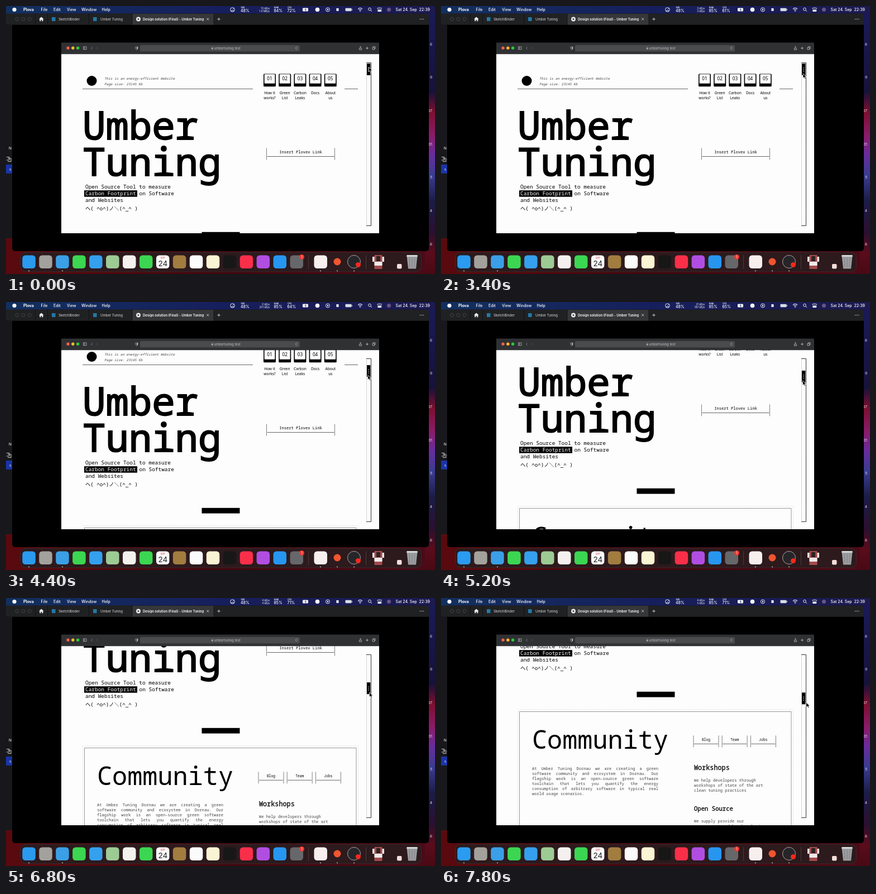
An HTML page for the animation above (8000 ms loop, 768x480 px).

```html
<!DOCTYPE html>
<html lang="en">
<head>
<meta charset="utf-8">
<title>Prototype scroll</title>
<style>
  html, body { margin: 0; width: 100%; height: 100%; overflow: hidden; background: #000; }
  svg { display: block; width: 100vw; height: 100vh; }
  text { white-space: pre; }
  .ui { font-family: Inter, "Open Sans", sans-serif; fill: #fff; }
  .mono { font-family: "Noto Sans Mono", "DejaVu Sans Mono", "Noto Sans CJK JP", monospace; fill: #000; }
  .label { font-family: "Noto Sans", sans-serif; fill: #000; }
  p { margin: 0; font: 7.1px/8.9px "Noto Sans Mono", "DejaVu Sans Mono", monospace; color: #444; text-align: justify; }
</style>
</head>
<body>
<svg id="stage" viewBox="0 0 768 480" xmlns="http://www.w3.org/2000/svg">
  <defs>
    <clipPath id="view"><rect x="99" y="86" width="569" height="321"/></clipPath>
    <linearGradient id="menu"><stop stop-color="#12305f"/><stop offset=".5" stop-color="#161f5c"/><stop offset="1" stop-color="#1c1a50"/></linearGradient>
    <linearGradient id="floor"><stop stop-color="#5a0a0e"/><stop offset=".5" stop-color="#40080e"/><stop offset="1" stop-color="#4c0a18"/></linearGradient>
    <linearGradient id="edge" x2="0" y2="1">
      <stop stop-color="#1a1a58"/><stop offset=".3" stop-color="#16123a"/><stop offset=".38" stop-color="#7c1030"/>
      <stop offset=".47" stop-color="#8a1c6a"/><stop offset=".54" stop-color="#6a2c9c"/><stop offset=".62" stop-color="#3a3c92"/>
      <stop offset=".72" stop-color="#1c1c48"/><stop offset=".84" stop-color="#2a1030"/><stop offset=".92" stop-color="#5a0c1c"/><stop offset="1" stop-color="#480a14"/>
    </linearGradient>
  </defs>
  <g id="desktop"></g>
  <g id="browser"></g>
  <g clip-path="url(#view)"><g id="page"></g></g>
  <g id="scrollbar"></g>
  <g id="thumb"></g>
  <path id="cursor" d="M0 0V8.2L2 6.5 3.3 9.5 4.9 8.8 3.6 5.9H6.2Z" fill="#000" stroke="#fff" stroke-width=".7"/>
</svg>
<script>
const $ = id => document.getElementById(id);
const INK = '#000', PAPER = '#fdfdfd', BAR = '#202122', ACTIVE = '#363738';

const rect = (x, y, w, h, fill, extra = '') => `<rect x="${x}" y="${y}" width="${w}" height="${h}" fill="${fill}" ${extra}/>`;
const dot = (x, y, r, fill, extra = '') => `<circle cx="${x}" cy="${y}" r="${r}" fill="${fill}" ${extra}/>`;
const path = (d, stroke = INK, width = 1, extra = '') => `<path d="${d}" fill="none" stroke="${stroke}" stroke-width="${width}" ${extra}/>`;
const text = (cls, x, y, size, str, extra = '') => `<text class="${cls}" x="${x}" y="${y}" font-size="${size}" ${extra}>${str}</text>`;
const ui = (...a) => text('ui', ...a);
const mono = (...a) => text('mono', ...a);
const MID = 'text-anchor="middle"', END = 'text-anchor="end"', BOLD = 'font-weight="600"';
const heavier = width => `stroke="${INK}" stroke-width="${width}"`;

function wallpaper() {
  let s = rect(0, 0, 768, 480, 'url(#floor)') + rect(750, 13, 18, 467, 'url(#edge)');
  ['6', '9', '37', '01', '5', '4', '6'].forEach((n, i) => s += ui(763, 70.5 + i * 59.7, 6.5, n, END + ' opacity=".9"'));
  s += rect(0, 13, 20, 403, '#18181c') + rect(0, 13, 20, 20, BAR);
  s += ui(5, 257, 6.5, 'N') + rect(0, 284, 11, 16, '#1a34a6') + ui(6, 295, 6, 's');
  return s + path('M1 270.5H6V276H1M3 273H9V278.5H3', '#ddd', .9);
}

function menuBar() {
  let s = rect(0, 0, 768, 13.5, 'url(#menu)') + dot(15, 6.5, 3.6, '#fff');
  s += ui(31, 9, 7, 'Plova', 'font-weight="700"');
  [['File', 62.5], ['Edit', 85], ['View', 109], ['Window', 135], ['Help', 171.5]]
    .forEach(([name, x]) => s += ui(x, 9, 7, name, 'font-weight="500"'));
  s += dot(405.5, 6.5, 3.8, 'none', 'stroke="#fff" stroke-width=".9"') + path('M405.5 6.5L408 4.5M403 8.5H408', '#fff', .8);
  [['SSD', 420.5], ['RAM', 480], ['CPU', 504]].forEach(([name, x]) => s += ui(x, 4.4, 3.5, name, BOLD));
  s += ui(420, 11.2, 6.9, '48%', 'font-weight="500"');
  s += ui(472, 5.8, 4.6, '', END + ' id="up"') + ui(472, 11.2, 4.6, '', END + ' id="down"');
  s += ui(479.5, 11.2, 6.9, '', 'id="ram" font-weight="500"') + ui(503.5, 11.2, 6.9, '', 'id="cpu" font-weight="500"');
  s += rect(531, 3.5, 10, 6, '#fff', 'rx="1.5"') + path('M537 4L535 6.7H537.5L536 9.2', '#161f5c', .8);
  s += dot(557.5, 6.5, 3.8, '#fff');
  s += dot(576, 6.5, 3.5, 'none', 'stroke="#fff" stroke-width=".9"') + '<path d="M575 4.8V8.2L578 6.5Z" fill="#fff"/>';
  s += rect(591.5, 4, 4, 5, '#fff');
  s += rect(607.5, 3.8, 11, 5.5, '#d8dde4', 'rx="1.4"') + rect(619, 5.5, 1, 2, '#fff');
  s += path('M630 5.3Q634 1.8 638 5.3M631.7 7.2Q634 5.2 636.3 7.2', '#fff', 1.1) + dot(634, 9, .9, '#fff');
  s += dot(651, 5.7, 2.4, 'none', 'stroke="#fff" stroke-width=".9"') + path('M652.8 7.5L655 9.8', '#fff', 1);
  s += rect(665, 3.2, 7.5, 2.8, 'none', 'rx="1.4" stroke="#fff" stroke-width=".8"') + rect(665, 7.2, 7.5, 2.8, '#fff', 'rx="1.4"');
  s += dot(685.5, 6.5, 3.5, '#6a5580');
  return s + ui(697.5, 9, 7, 'Sat 24. Sep  22:39', 'font-weight="500"');
}

function appWindow() {
  let s = rect(11, 13.5, 746, 425.5, '#000', 'rx="5"') + rect(11, 13.5, 746, 20, BAR, 'rx="4"') + rect(11, 25, 746, 8.5, BAR);
  [20, 31, 42].forEach(x => s += dot(x, 23.5, 3, 'none', 'stroke="#4c4d4e" stroke-width=".8"'));
  s += '<path d="M59 23.5L63.3 19.5 67.6 23.5H66.3V27.3H64.3V24.8H62.3V27.3H60.3V23.5Z" fill="#f0f0f0"/>';
  s += rect(226, 14, 146, 19.5, ACTIVE);
  s += path('M52.5 14V33M74.5 14V33M148.5 14V33M226 14V33M372 14V33', '#101011', .8);
  [82, 156].forEach(x => s += rect(x, 20, 6.5, 7, '#2378a8'));
  s += ui(94, 26, 6, 'SketchBinder', 'opacity=".85"') + ui(169, 26, 6, 'Umber Tuning', 'opacity=".85"');
  s += dot(237, 23.5, 3.9, '#eee') + `<path d="M235.8 21.5V25.5L239.2 23.5Z" fill="${ACTIVE}"/>`;
  s += ui(245, 26, 5.9, 'Design solution (Final) - Umber Tuning', BOLD);
  s += path('M359.3 21.5L363.2 25.4M363.2 21.5L359.3 25.4M378.3 23.5H383.7M381 20.8V26.2', '#eee', .8);
  return s + [741.5, 744.5, 747.5].map(x => dot(x, 23.5, .8, '#ccc')).join('');
}

function dock() {
  const tiles = ['#2a9bee', '#a3a19c', '#3a9fe6', '#3bd652', '#35a0ee', '#9dcb94', '#f4f0ee', '#3bd652', '#fbfbfb', '#a27d40',
    '#fbfbfb', '#fbf4d4', '#171717', '#f92f4a', '#b14ee2', '#2796f0', '#66676a'];
  let s = rect(25.5, 441, 718, 35, '#2c1a1d', 'rx="9" stroke="#4a3235" stroke-width=".6"');
  tiles.forEach((fill, i) => s += rect(29.3 + i * 29.95, 446.5, 23.5, 23.5, fill, 'rx="5.5"'));
  s += ui(280.8, 466, 13.5, '24', MID + ' style="fill:#222"') + ui(280.8, 452.5, 4.5, 'SEP', MID + ' style="fill:#e33"');
  s += dot(529.5, 449.5, 4.5, '#f5382e') + ui(529.5, 451.8, 6, '1', MID);
  s += path('M541.5 446V471M644.5 446V471', '#5e484b', .7);
  s += rect(551.5, 446.5, 23.5, 23.5, '#f6efee', 'rx="5.5"') + dot(593, 458, 6.5, '#ef5530');
  s += dot(623, 458, 11.5, '#26262a', 'stroke="#c4c4c6" stroke-width=".8"') + dot(630.5, 463.5, 4.5, '#f3291f');
  s += rect(656, 449, 21, 9, '#eceaea') + rect(659.5, 446, 14, 25, '#a54a4c') + rect(659.5, 458, 14, 7, '#eceaea') + rect(663, 448, 7, 9, '#2c2424');
  s += rect(700, 462, 8.5, 8.5, '#f3dedc', 'rx="2"');
  s += '<path d="M717.5 447.5H736.5L734 470.5H720Z" fill="#9c9da0"/>' + rect(717, 446, 20, 3, '#d4d5d8', 'rx="1.5"');
  s += path('M722 451L723 468M727 451V468M732 451L731 468', '#737478', .7);
  return s + [41, 101, 563, 593, 623].map(x => dot(x, 474.3, .9, '#e6e2e2')).join('');
}

function browser() {
  let s = rect(99, 66, 569, 341, PAPER) + rect(99, 65.5, 569, 20.7, '#2f3133');
  ['#ff5f52', '#f6bd2e', '#2fc844'].forEach((c, i) => s += dot(111 + i * 8.8, 75.3, 2.7, c));
  s += rect(138.5, 73, 5.5, 4.8, 'none', 'stroke="#c4c5c6" stroke-width=".7"') + path('M140.5 73V77.8', '#c4c5c6', .7);
  s += path('M154.5 73.3L152.5 75.4 154.5 77.5', '#a4a5a6', .7) + path('M162 73.3L164 75.4 162 77.5', '#5c5e60', .7);
  s += path('M231.8 73.2H236V75.5Q236 77.5 233.9 78.3Q231.8 77.5 231.8 75.5Z', '#b4b5b6', .7) + rect(234, 73.3, 2, 4, '#b4b5b6');
  s += rect(240, 70, 286, 11.5, '#494b4d', 'rx="2.5"');
  s += rect(367.8, 75, 3, 2.6, '#a4a5a6') + path('M368.4 75V73.6H370.2V75', '#a4a5a6', .5);
  s += ui(372.3, 77.8, 5.9, 'umbertuning.test', 'opacity=".65"');
  s += path('M522 74.2A2 2 0 1 0 522.2 76.2', '#b4b5b6', .7);
  s += path('M632.5 75V78.3H636.5V75M634.5 77V72.5M633.3 73.6L634.5 72.4 635.7 73.6M644 75.5H649M646.5 73V78', '#d2d3d4', .7);
  return s + path('M656 74.3H659.5V78H656ZM657.3 74V72.8H661V76.5H659.8', '#d2d3d4', .7);
}

// Open button: two side posts joined by a rule near the bottom.
function button(x, y, w, label, size) {
  const r = x + w;
  return path(`M${x} ${y}V${y + 21}M${r} ${y}V${y + 21}`, INK, .5)
    + path(`M${x + 1} ${y + 15}H${r - 1}`, INK, .6)
    + mono(x + w / 2, y + 9.7, size, label, MID);
}

function key(x, number, lines) {
  return rect(x - 11, 121.5, 22, 22.8, INK, 'rx="1.5"') + rect(x - 9.4, 122.3, 18.8, 16.4, PAPER, 'rx="1"')
    + text('label', x, 133.3, 8.2, number, MID)
    + lines.map((line, i) => text('label', x, 158 + i * 8.8, 6.6, line, MID)).join('');
}

function page() {
  const italic = 'font-style="italic" style="fill:#444"', soft = 'style="fill:#444"';
  let s = dot(153.5, 134, 9, INK);
  s += mono(176, 132.3, 6, 'This is an energy-efficient Website', italic) + mono(176, 141.7, 6, 'Page size: 23145 Kb', italic);
  s += path('M137 148.5H442M606 148.5H630', INK, .6);
  [['How it', 'works?'], ['Green', 'List'], ['Carbon', 'Leaks'], ['Docs'], ['About', 'us']]
    .forEach((lines, i) => s += key(472 + i * 27.2, '0' + (i + 1), lines));
  s += mono(137, 238.5, 69, 'Umber', heavier(2)) + mono(137, 303.5, 69, 'Tuning', heavier(2));
  s += button(466.5, 254.5, 122, 'Insert Plovex Link', 7.1);
  s += mono(142, 327, 9.45, 'Open Source Tool to measure');
  s += rect(140, 330.2, 95, 11.5, INK) + mono(142, 339, 9.45, 'Carbon Footprint', `style="fill:${PAPER}"`);
  s += mono(238.5, 339, 9.45, 'on Software') + mono(142, 350.5, 9.45, 'and Websites');
  s += mono(142, 366.3, 9.2, 'ヘ( ^o^)ノ＼(^_^ )');
  s += rect(350.5, 404.8, 68, 9.8, INK);

  s += path('M137.5 900V436.5H630.5V900', '#aaa', .5, 'stroke-dasharray="1 2"');
  s += path('M140.5 900V440.5H627V900', '#333', .5);
  s += mono(163, 507, 45.2, 'Community');
  ['Blog', 'Team', 'Jobs'].forEach((name, i) => s += button(452 + i * 51.2, 483.3, 45, name, 6.3));
  s += `<foreignObject x="163" y="538" width="226" height="80"><p xmlns="http://www.w3.org/1999/xhtml">At Umber Tuning Dornau we are creating a green software community and ecosystem in Dornau. Our flagship work is an open-source green software toolchain that lets you quantify the energy consumption of arbitrary software in typical real world usage scenarios.</p></foreignObject>`;
  s += mono(453, 544.5, 11.8, 'Workshops', heavier(.3));
  ['We help developers through', 'workshops of state of the art', 'clean tuning practices']
    .forEach((line, i) => s += mono(453, 566 + i * 9, 7.1, line, soft));
  s += mono(453, 617.5, 10.6, 'Open Source', heavier(.3));
  ['We supply provide our', 'measurement and benchmarks in']
    .forEach((line, i) => s += mono(453, 639 + i * 9, 7.1, line, soft));
  return s;
}

$('desktop').innerHTML = wallpaper() + appWindow() + menuBar() + dock();
$('browser').innerHTML = browser();
$('page').innerHTML = page();
$('scrollbar').innerHTML = path('M645 101.5H653.5V393.5H645', INK, .8) + path('M645.5 101V393.5', INK, .4, 'stroke-dasharray="1 1.5"');
$('thumb').innerHTML = rect(646, 103, 6.3, 21, INK) + [110.5, 113.5, 116.5].map(y => rect(648.2, y, 1.8, 1, '#ddd')).join('');

const LOOP = 8000, STEP = 200, THUMB_RATIO = .28;
const scrollKeys = [[3600, 0], [4400, 36], [5200, 71], [6000, 124], [6800, 172], [7800, 237]];
const cursorX = [[0, 649.5], [1400, 649.5], [3400, 648], [5200, 647.5], [6000, 648.5], [6800, 650.5], [7800, 654]];
const cursorY = [[0, 109.5], [1400, 109.5], [2000, 126], [2600, 121], [3400, 121]];
const stats = [
  [0, '13 kB/s', '1.4 MB/s', 84, 72], [1600, '5 kB/s', '12 kB/s', 85, 66], [2800, '3 kB/s', '3 kB/s', 85, 61],
  [3800, '0 kB/s', '201 kB/s', 85, 64], [4800, '21 kB/s', '187 kB/s', 85, 65],
  [5800, '0 kB/s', '19 kB/s', 85, 67], [6800, '4 kB/s', '4 kB/s', 85, 71], [7800, '4 kB/s', '5 kB/s', 85, 71]
];

function along(keys, t) {
  const i = keys.findIndex(k => k[0] > t);
  if (i < 0) return keys[keys.length - 1][1];
  if (i === 0) return keys[0][1];
  const [t0, a] = keys[i - 1], [t1, b] = keys[i];
  return a + (b - a) * (t - t0) / (t1 - t0);
}

function draw(time) {
  const t = Math.floor(time % LOOP / STEP) * STEP;
  const scroll = along(scrollKeys, t), drag = scroll * THUMB_RATIO;
  $('page').setAttribute('transform', `translate(0 ${-scroll})`);
  $('thumb').setAttribute('transform', `translate(0 ${drag})`);
  $('cursor').setAttribute('transform', `translate(${along(cursorX, t)} ${along(cursorY, t) + drag})`);
  const [, up, down, ram, cpu] = stats.filter(s => s[0] <= t).pop();
  $('up').textContent = up;
  $('down').textContent = down;
  $('ram').textContent = ram + '%';
  $('cpu').textContent = cpu + '%';
}

const start = performance.now();
function tick() {
  draw(performance.now() - start);
  requestAnimationFrame(tick);
}
tick();
</script>
</body>
</html>
```
